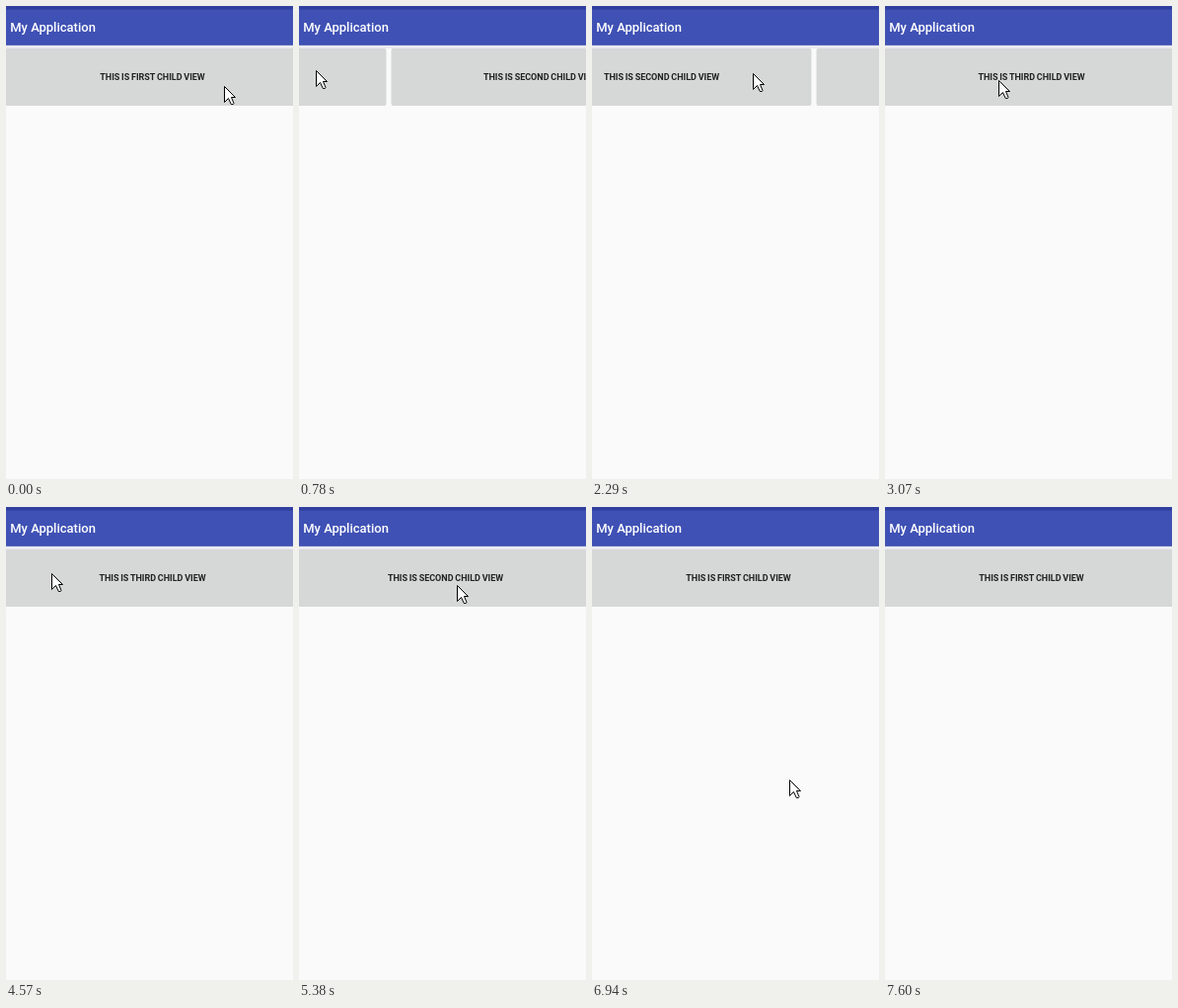
An HTML page that plays this animation: 291x479 px, repeating every 8.44 s.

```html
<!DOCTYPE html>
<html lang="en">
<head>
<meta charset="utf-8">
<style>
  html, body { margin: 0; height: 100%; overflow: hidden; background: #fafafa; }
  svg { display: block; width: 291px; height: 479px; }
  text { font-family: Roboto, sans-serif; font-weight: 500; }
  .label { font-size: 9px; font-weight: 700; word-spacing: -.5px; fill: #212121; text-anchor: middle; }
</style>
</head>
<body>
<svg viewBox="0 0 291 479">
  <rect width="291" height="479" fill="#fafafa"/>
  <rect width="291" height="40" fill="#3f51b5"/>
  <rect width="291" height="3.5" fill="#303f9f"/>
  <rect y="39" width="291" height="1" fill="#5c6ab8"/>
  <rect y="40" width="291" height="3" fill="#e9eaf1"/>
  <text x="4.2" y="26" font-size="13" fill="#fff">My Application</text>
  <g id="row"></g>
  <path id="cursor" d="M.5 .5V16.5L4.5 12.5 7.3 18.5H9.3L10 17.5 7.5 11.5H11.5Z"
    fill="#fff" stroke="#000" stroke-linejoin="round"/>
</svg>
<script>
const LOOP = 8440, STEP = 130, HIDE = 7600, SETTLE = 390;
const PAGE = 309, WIDTH = 304, CENTER = 148.5;
const row = document.getElementById('row');
const cursor = document.getElementById('cursor');

row.innerHTML = ['FIRST', 'SECOND', 'THIRD'].map((name, i) => {
  const mid = CENTER + i * PAGE, left = mid - WIDTH / 2;
  return `<rect x="${left}" y="43" width="${WIDTH}" height="58" rx="2" fill="#d6d7d7"/>
    <text class="label" x="${mid}" y="75">THIS IS ${name} CHILD VIEW</text>`;
}).join('');

// Pointer path; a point with a page ends a drag, and the row then settles on that page
const path = [
  { t: 0, x: 221, y: 81 },
  { t: 260, x: 229, y: 79 },
  { t: 780, x: 17, y: 65, page: 1 },
  { t: 1950, x: 241, y: 73 },
  { t: 2210, x: 163, y: 68, page: 2 },
  { t: 2990, x: 115, y: 75 },
  { t: 4030, x: 239, y: 70 },
  { t: 4550, x: 46, y: 67 },
  { t: 4940, x: 200, y: 76, page: 1 },
  { t: 5980, x: 75, y: 84 },
  { t: 6370, x: 186, y: 86, page: 0 },
  { t: 7410, x: 213, y: 466 }
];

const mix = (a, b, p) => a + (b - a) * p;
const clamp = p => Math.min(1, Math.max(0, p));
const smooth = p => p * p * (3 - 2 * p);
const easeOut = p => 1 - (1 - p) ** 2;

function pointerAt(t) {
  const i = path.findIndex(k => k.t > t);
  if (i < 0) return path.at(-1);
  const a = path[i - 1], b = path[i];
  const part = (t - a.t) / (b.t - a.t);
  const p = 'page' in b ? part : smooth(part);
  return { x: mix(a.x, b.x, p), y: mix(a.y, b.y, p) };
}

function scrollAt(t) {
  let page = 0, offset = 0;
  path.forEach((end, i) => {
    const press = path[i - 1];
    if (!('page' in end) || t < press.t) return;
    const dragged = page * PAGE + press.x - pointerAt(Math.min(t, end.t)).x;
    offset = mix(dragged, end.page * PAGE, easeOut(clamp((t - end.t) / SETTLE)));
    page = end.page;
  });
  return offset;
}

function draw(now) {
  const time = now % LOOP;
  const t = Math.floor(time / STEP) * STEP;
  const { x, y } = pointerAt(t);
  row.setAttribute('transform', `translate(${-scrollAt(t)} 0)`);
  cursor.setAttribute('transform', `translate(${Math.round(x)} ${Math.round(y)})`);
  cursor.style.display = time < HIDE ? '' : 'none';
}

const start = performance.now();
function loop() {
  draw(performance.now() - start);
  requestAnimationFrame(loop);
}
loop();
</script>
</body>
</html>
```
